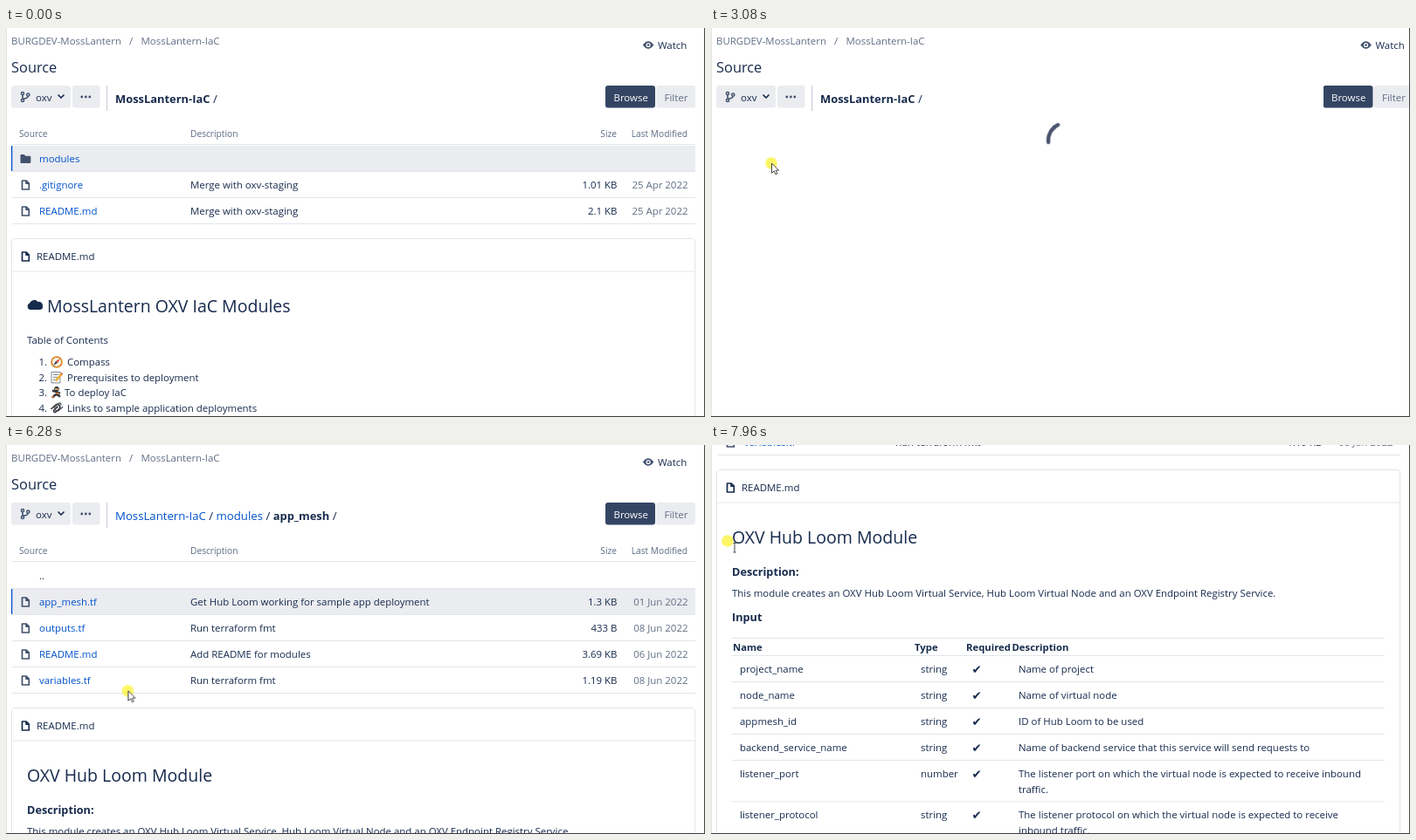
These frames come from a looping animation (800x446 px, 8 s). An HTML page:

```html
<!DOCTYPE html>
<html lang="en">
<head>
<meta charset="utf-8">
<title>Repository browser</title>
<style>
html, body { margin: 0; width: 100%; height: 100%; overflow: hidden; background: #fff; }
svg { display: block; width: 800px; height: 446px; }
text { font: 11.45px "Open Sans", "Noto Sans", sans-serif; fill: #172b4d; white-space: pre; }
.link { fill: #0052cc; }
.gray { fill: #626f86; }
.small { font-size: 10.2px; fill: #5e6c84; }
.white { fill: #fff; }
.end { text-anchor: end; }
.bold { font-weight: 700; font-size: 11.3px; }
.sub { font-weight: 700; font-size: 12.7px; }
.head { font-size: 16.4px; }
.title { font-size: 19.5px; }
.path { font-size: 13.2px; }
.path .now { font-weight: 700; font-size: 12.9px; }
.tick { font: 13.5px "DejaVu Sans", sans-serif; }

.window { opacity: 0; animation: 8s step-end infinite; }
.side { animation: widen 8s step-end infinite; }
.scroll { animation: scroll 8s cubic-bezier(.333, 0, .667, 1) infinite; }
.cursor { animation: move 8s cubic-bezier(.333, 0, .667, 1) infinite; }
.spin { animation: spin .8s linear infinite; }

@keyframes spin { to { transform: rotate(360deg); } }
@keyframes widen {
  0%, 44.5%, 70%, 100% { transform: none; }
  34.5%, 63.75% { transform: translateX(14.5px); }
}
@keyframes scroll {
  0%, 81.41% { transform: translateY(0); }
  83.64%, 85.5% { transform: translateY(-91px); }
  87.75%, 90.5% { transform: translateY(-182px); }
  92.75%, 100% { transform: translateY(-273px); }
}
@keyframes move {
  0%, 12.74% { transform: translate(60px, 456px); }
  24.36%, 49% { transform: translate(69px, 155px); }
  57%, 74% { transform: translate(59px, 180px); }
  82%, 84% { transform: translate(194px, 351px); }
  88.5%, 91% { transform: translate(167px, 313px); }
  99.5%, 100% { transform: translate(19px, 110px); }
}
</style>
</head>
<body>
<svg id="stage" viewBox="0 0 800 446"></svg>
<script>
const INK = '#172b4d', SLATE = '#42526e', LINE = '#e3e5e9', FILL = '#ebecf0';
const LOOP = 8000, LOAD1 = 2760, LIST = 3560, LOAD2 = 5100, APP = 5600, DETAIL = 5960;

const sheet = document.head.appendChild(document.createElement('style'));
let windows = 0;

// Shows content only between two times of the loop.
function show(from, to, content) {
  const name = 'w' + windows++, pc = ms => ms / LOOP * 100 + '%';
  sheet.append(`@keyframes ${name}{0%{opacity:0}${pc(from)}{opacity:1}${pc(to)},100%{opacity:0}}`);
  return `<g class="window" style="animation-name:${name}">${content}</g>`;
}

const text = (x, y, s, cls = '') => `<text x="${x}" y="${y}" class="${cls}">${s}</text>`;
const rect = (x, y, w, h, fill, r = 0) =>
  `<rect x="${x}" y="${y}" width="${w}" height="${h}" rx="${r}" fill="${fill}"/>`;
const rule = (x1, x2, y) => rect(x1, y - .5, x2 - x1, 1, LINE);
const at = (x, y, content) => `<g transform="translate(${x} ${y})">${content}</g>`;
const stroke = (d, color, width, more = '') =>
  `<path d="${d}" fill="none" stroke="${color}" stroke-width="${width}" stroke-linejoin="round" ${more}/>`;
const shape = (d, fill, more = '') => `<path d="${d}" fill="${fill}" ${more}/>`;
const dot = (x, y, r, fill, more = '') => `<circle cx="${x}" cy="${y}" r="${r}" fill="${fill}" ${more}/>`;

const fileIcon = (y, color = SLATE) =>
  at(22.3, y, stroke('M-3.8-5H1L4-2V5H-3.8ZM.8-5V-1.8H4', color, 1.7));
const folderIcon = y =>
  at(22.3, y, shape('M-5.8-4q0-1 1-1H-1.5L0-3.2H5q1 0 1 1V4q0 1-1 1H-4.8q-1 0-1-1Z', SLATE));

const icons = [
  dot(0, 0, 6.8, '#dc8a2c') + dot(0, 0, 5, '#f5f1e4') +
    shape('M4-4 1 1-1-1Z', '#d83b2f') + shape('M-4 4-1-1 1 1Z', '#34424f'),
  rect(-6, -6, 10, 12.5, '#f7f7f7', 1) + stroke('M-6-6H4V6.5H-6ZM-4-3H2M-4 0H1M-4 3H0', '#77808a', .9) +
    stroke('M6-4-1 4', '#f0ae2a', 2.4) + stroke('M6.5-4.5 5.5-3.5', '#d85a50', 2.4),
  dot(0, -4, 2.8, '#30333a') + rect(-2, -4.5, 4, 1.5, '#f3b65f') +
    stroke('M0-1V2L4 5M0 2-3 4-5 6M-5-2-1-1 4 1', '#34363e', 2.5) +
    stroke('M-1 1H3M-5 4-3 6', '#df7b34', 1.6),
  `<g transform="rotate(-42)">${
    stroke('M-6-3H1a3 3 0 0 1 0 6H-4a1.5 1.5 0 0 1 0-3H2', '#272b31', 1.5)}${
    stroke('M6 4H0a3 3 0 0 1 0-6H5a1.5 1.5 0 0 1 0 3', '#555b63', 1.4)}</g>`
];

const rowY = i => 150 + 30 * i;

function row(i, name, { folder, picked } = {}) {
  const y = rowY(i);
  const up = name === '..';
  return (picked ? rect(6, y - 15, 783, 29, FILL) + rect(6, y - 15, 1.3, 29, '#0052cc') : '') +
    rule(7, 789, y + 14.5) +
    (up ? '' : folder ? folderIcon(y) : fileIcon(y)) +
    text(38, y + 4, name, up ? '' : 'link');
}

const details = (i, note, size, date) =>
  text(211, rowY(i) + 4, note) + text(699.5, rowY(i) + 4, size, 'end') +
  text(780.5, rowY(i) + 4, date, 'end gray');

const sourceHead = text(15, 125, 'Source', 'small') + rule(7, 789, 133.5);
const briefHead = text(780.5, 125, 'Size', 'small end');
const fullHead = text(211, 125, 'Description', 'small') + text(699, 125, 'Size', 'small end') +
  text(780, 125, 'Last Modified', 'small end');

const readmeBox = (y, height) =>
  `<rect x="6.5" y="${y}" width="782" height="${height}" rx="3" fill="none" stroke="${LINE}"/>` +
  rule(7, 788, y + 37.5) + fileIcon(y + 20.5, INK) + text(35, y + 24.5, 'README.md');

function header() {
  const root = 'MossLantern-IaC';
  const link = s => `<tspan class="link">${s}</tspan> / `;
  const now = s => `<tspan class="now">${s}</tspan> /`;
  const path = s => text(125, 86, s, 'path');
  return text(6, 19, 'BURGDEV-MossLantern', 'gray') + text(141, 19, '/', 'gray') +
    text(154.5, 19, root, 'gray') + text(6, 51, 'Source', 'head') +
    rect(6, 66, 68, 25.5, FILL, 3) + rect(76, 66, 31.5, 25.5, FILL, 3) +
    at(22, 79, stroke('M-3-2V3M3-1Q3 2-2 2', SLATE, 1.6) +
      [[-3, -4], [-3, 4], [3.3, -2.5]].map(([x, y]) => dot(x, y, 1.6, FILL, `stroke="${SLATE}" stroke-width="1.5"`)).join('')) +
    text(34, 83.5, 'oxv') + stroke('M60 77 63 80 66 77', INK, 1.7, 'stroke-linecap="round"') +
    [86.8, 91.3, 95.8].map(x => dot(x, 79, 1.4, SLATE)).join('') +
    rect(115, 66, 1.2, 29, '#c9ced7') +
    show(0, LIST, path(now(root))) +
    show(LIST, APP, path(link(root) + now('modules'))) +
    show(APP, LOOP, path(link(root) + link('modules') + now('app_mesh'))) +
    `<g class="side">${
      shape('M728.8 19.5Q735 11 741.4 19.5 735 28 728.8 19.5Z', SLATE) +
      dot(735.1, 19.5, 2.6, '#fff') + dot(735.1, 19.5, 1.3, SLATE) + text(746, 23.5, 'Watch') +
      rect(686, 66, 57, 25.5, '#344563', 3) + rect(744, 66, 45, 25.5, FILL, 3) +
      text(695.5, 83.5, 'Browse', 'white') + text(753.5, 83.5, 'Filter', 'gray')}</g>`;
}

function homePage() {
  const contents = ['Compass', 'Prerequisites to deployment', 'To deploy IaC',
    'Links to sample application deployments'];
  return sourceHead + fullHead +
    row(0, 'modules', { folder: true, picked: true }) + row(1, '.gitignore') + row(2, 'README.md') +
    details(1, 'Merge with oxv-staging', '1.01 KB', '25 Apr 2022') +
    details(2, 'Merge with oxv-staging', '2.1 KB', '25 Apr 2022') +
    readmeBox(241.5, 240) +
    at(33, 318, shape('M-5.5 5A4 4 0 0 1-6-2.5 5.5 5.5 0 0 1 3.5-4 4.5 4.5 0 0 1 9 1Q9.5 5 5 5Z', INK)) +
    text(47, 326, 'MossLantern OXV IaC Modules', 'title') +
    text(24, 362, 'Table of Contents') +
    contents.map((s, i) => {
      const y = 383 + 17.4 * i;
      return text(37.5, y + 4.3, i + 1 + '.') + at(58, y, icons[i]) + text(i === 2 ? 67 : 70, y + 4.3, s);
    }).join('');
}

function modulesPage() {
  const names = ['app_mesh', 'cache', 'cluster', 'database', 'network', 'security', 'service', 'storage'];
  return sourceHead + show(LIST, 4300, briefHead) + show(4300, LOAD2, fullHead) + row(0, '..') +
    names.map((s, i) => row(i + 1, s, { folder: true, picked: !i })).join('');
}

function appPage() {
  const files = [
    ['app_mesh.tf', 'Get Hub Loom working for sample app deployment', '1.3 KB', '01 Jun 2022'],
    ['outputs.tf', 'Run terraform fmt', '433 B', '08 Jun 2022'],
    ['README.md', 'Add README for modules', '3.69 KB', '06 Jun 2022'],
    ['variables.tf', 'Run terraform fmt', '1.19 KB', '08 Jun 2022']
  ];
  const inputs = [
    ['project_name', 'string', 'Name of project'],
    ['node_name', 'string', 'Name of virtual node'],
    ['appmesh_id', 'string', 'ID of Hub Loom to be used'],
    ['backend_service_name', 'string', 'Name of backend service that this service will send requests to'],
    ['listener_port', 'number', 'The listener port on which the virtual node is expected to receive inbound', 'traffic.'],
    ['listener_protocol', 'string', 'The listener protocol on which the virtual node is expected to receive', 'inbound traffic.']
  ];
  const brief = briefHead + files.map((f, i) => text(780.5, rowY(i + 1) + 4, f[2], 'end')).join('');
  const full = fullHead + files.map((f, i) => details(i + 1, ...f.slice(1))).join('');
  let y = 530;
  const table = inputs.map(([name, type, note, more]) => {
    const cells = text(33, y + 4, name) + text(240, y + 4, type) + text(298.5, y + 4.5, '✔', 'tick') +
      text(352, y + 4, note) + (more ? text(352, y + 21.5, more) : '');
    y += more ? 47.3 : 30;
    return cells + rule(24, 771, y - 15.5);
  }).join('');
  return sourceHead + row(0, '..') + files.map((f, i) => row(i + 1, f[0], { picked: !i })).join('') +
    show(APP, DETAIL, brief) + show(DETAIL, LOOP, full) +
    readmeBox(301.5, 560) +
    text(24, 386, 'OXV Hub Loom Module', 'title') +
    text(24, 422.5, 'Description:', 'sub') +
    text(24, 447, 'This module creates an OXV Hub Loom Virtual Service, Hub Loom Virtual Node and an OXV Endpoint Registry Service.') +
    text(24, 474.5, 'Input', 'sub') + rule(24, 771, 494.5) + rule(24, 771, 514.5) +
    [[25, 'Name'], [233, 'Type'], [292, 'Required'], [344.5, 'Description']]
      .map(([x, s]) => text(x, 509.3, s, 'bold')).join('') + table;
}

function cursor() {
  const outline = 'stroke="#333" stroke-width=".9" stroke-linejoin="round"';
  const arrow = shape('M.5 0V11.3L3.2 8.9 5 12.9 6.9 12 5.1 8.2H8.6Z', '#fff', outline);
  const hand = shape('M4 1Q4-.5 5.2-.5 6.3-.5 6.3 1V5Q8-.5 8 5.5 9.7 4.5 9.8 6.3 11.3 5.7 11.3 7.5V10.5Q11 13 10 15H4.5Q3.5 12 1.3 9.5 .8 7.5 2.5 8L4 9.5Z', '#fff', outline);
  const beam = stroke('M6.5 2.5H9.5M8 2.5V13M6.5 13H9.5', '#444', 1);
  const poses = [
    [arrow, 0, 1860], [hand, 1860, LOAD1], [arrow, LOAD1, 4300], [hand, 4300, LOAD2],
    [arrow, LOAD2, APP], [hand, APP, 6050], [arrow, 6050, 7800], [beam, 7800, LOOP]
  ];
  return `<g class="cursor">${dot(0, 0, 6.8, '#fbf43c', 'opacity=".78"')}${
    poses.map(([pose, from, to]) => show(from, to, pose)).join('')}</g>`;
}

const spinner = at(406, 129, `<g class="spin">${
  stroke('M-13.4-14.9A20 20 0 0 1 9.1-17.8', '#4b5270', 4.3, 'stroke-linecap="round"')}</g>`);

document.getElementById('stage').innerHTML =
  rect(0, 0, 800, 446, '#fff') +
  `<g class="scroll">${header() +
    show(0, LOAD1, homePage()) + show(LOAD1, LIST, spinner) +
    show(LIST, LOAD2, modulesPage()) + show(LOAD2, APP, spinner) +
    show(APP, LOOP, appPage())}</g>` +
  cursor() +
  rect(0, 0, 1, 446, '#e3e3e5') + rect(799, 0, 1, 446, '#47474a') + rect(0, 445, 800, 1, '#3c3c40');
</script>
</body>
</html>
```
